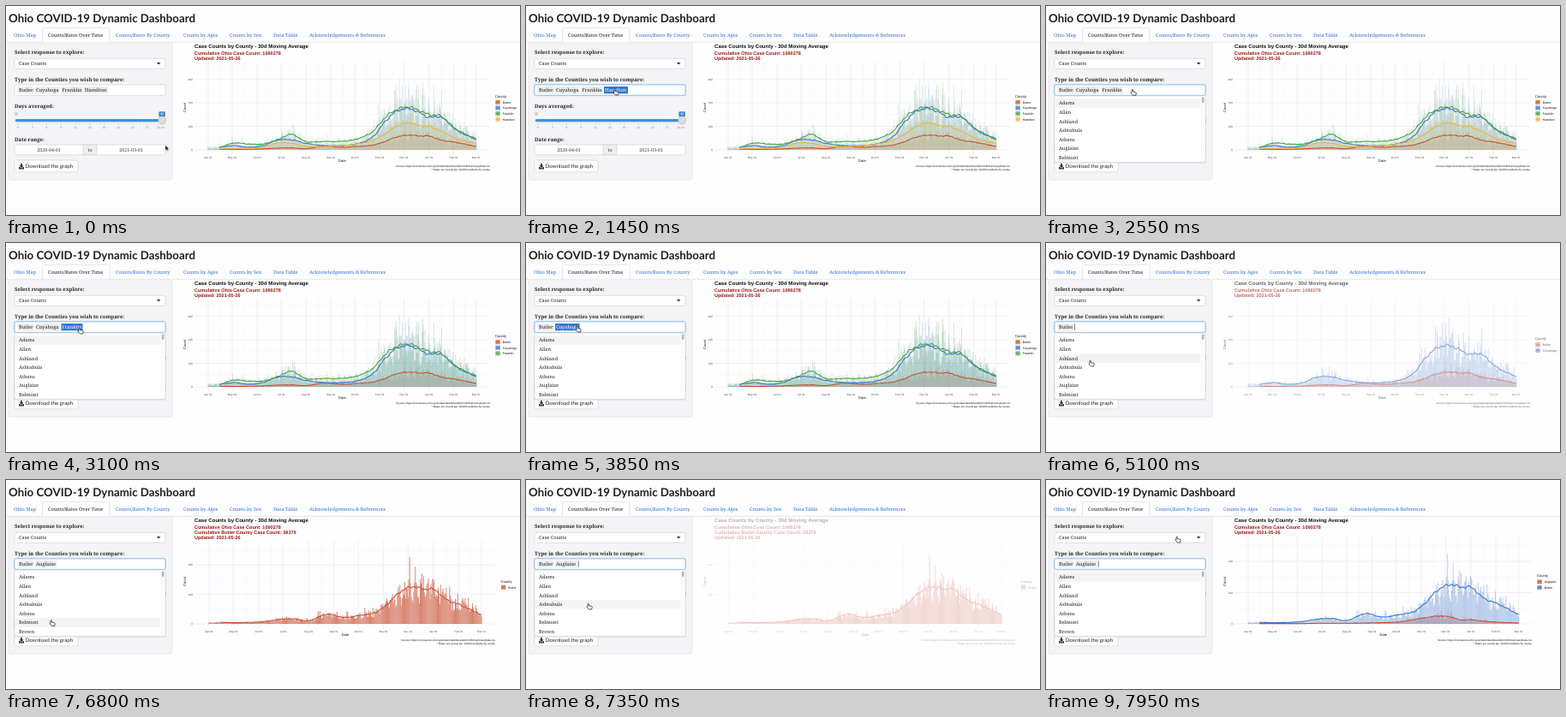
An HTML page that plays this animation: 600 by 244 pixels, repeating every 8 s.

```html
<!DOCTYPE html>
<html lang="en">
<head>
<meta charset="utf-8">
<title>Ohio COVID-19 Dynamic Dashboard</title>
<style>
  html, body { margin: 0; width: 100%; height: 100%; overflow: hidden; background: #fefdff; }
  svg { display: block; width: 600px; height: 244px; text-rendering: geometricPrecision; }
  text { white-space: pre; }
  .heading { font: 700 13.3px Lato, sans-serif; fill: #1f1f22; }
  .ui { font: 5.65px "Noto Serif", serif; fill: #222; }
  .link { fill: #2f72d2; }
  .label { font: 700 6px "Noto Serif", serif; fill: #262626; }
  .date { font: 5.4px "Noto Serif", serif; fill: #333; }
  .button { font: 6.2px Lato, sans-serif; fill: #262626; }
  .tick { font: 3.3px "Liberation Sans", Arial, sans-serif; fill: #888; }
  .chart text { font-family: "Liberation Sans", Arial, sans-serif; }
  .title { font-size: 6.1px; font-weight: 700; fill: #111; }
  .sub { font-size: 5.52px; font-weight: 700; fill: #98170e; }
  .axis { font-size: 3.2px; fill: #4d4d4d; }
  .name { font-size: 4.1px; fill: #111; }
  .key { font-size: 3.6px; fill: #111; }
  .caption { font-size: 3.08px; fill: #111; }
  .mid { text-anchor: middle; }
  .end { text-anchor: end; }
</style>
</head>
<body>
<svg id="stage" viewBox="0 0 600 244" xmlns="http://www.w3.org/2000/svg"></svg>
<script>
const LOOP = 8000;
const COLORS = ['#c94f31', '#3a74c8', '#43a047', '#eeb23c'];
const MONTHS = ['Apr', 'May', 'Jun', 'Jul', 'Aug', 'Sep', 'Oct', 'Nov', 'Dec', 'Jan', 'Feb', 'Mar'];
const MONTH_DAYS = [0, 30, 61, 91, 122, 153, 183, 214, 244, 275, 306, 334];
const LAST_DAY = 334, BASE = 168;

// Moving averages, sampled at these days
const DAYS = [14, 32, 50, 68, 86, 104, 122, 145, 165, 185, 205, 220, 234, 250, 262, 276, 290, 310, 334];
const CASES = {
  Butler:   [5, 4, 5, 8, 15, 17, 11, 33, 22, 29, 40, 70, 108, 126, 118, 116, 84, 62, 30],
  Cuyahoga: [22, 36, 22, 36, 82, 85, 55, 36, 37, 50, 110, 235, 325, 350, 320, 275, 280, 165, 87],
  Franklin: [20, 58, 50, 50, 85, 132, 70, 72, 72, 92, 155, 270, 338, 362, 335, 298, 285, 172, 94],
  Hamilton: [8, 12, 14, 22, 58, 55, 30, 28, 35, 50, 80, 135, 195, 230, 205, 195, 160, 95, 55],
  Auglaize: [1, 1, 1, 1, 2, 2, 2, 3, 4, 6, 14, 20, 25, 22, 13, 13, 9, 5, 3]
};

const wide = { x0: 236, dx: .9365, unit: .1378, step: 200, max: 600, top: 65, right: 565, legend: 571 };
const CHARTS = [
  { ...wide, until: 2900, names: ['Butler', 'Cuyahoga', 'Franklin', 'Hamilton'] },
  { ...wide, until: 4350, names: ['Butler', 'Cuyahoga', 'Franklin'] },
  { ...wide, until: 5500, names: ['Butler', 'Cuyahoga'] },
  { x0: 237, dx: .952, unit: .345, step: 100, max: 200, top: 71, right: 571, legend: 577.5,
    until: 7400, names: ['Butler'], note: 'Cumulative Butler County Case Count: 38379' },
  { x0: 236, dx: .945, unit: .365, step: 100, max: 200, top: 66, right: 567, legend: 573,
    until: LOOP, names: ['Auglaize', 'Butler'] }
];
const FADES = [2600, 4020, 4970, 7000];

const FIELD = [
  { at: 0, items: ['Butler', 'Cuyahoga', 'Franklin', 'Hamilton'] },
  { at: 850, items: ['Butler', 'Cuyahoga', 'Franklin', 'Hamilton'], picked: 'Hamilton', focus: true },
  { at: 2100, items: ['Butler', 'Cuyahoga', 'Franklin'], focus: true, open: true },
  { at: 2900, items: ['Butler', 'Cuyahoga', 'Franklin'], picked: 'Franklin', focus: true, open: true },
  { at: 3500, items: ['Butler', 'Cuyahoga'], focus: true, open: true },
  { at: 3700, items: ['Butler', 'Cuyahoga'], picked: 'Cuyahoga', focus: true, open: true },
  { at: 4450, items: ['Butler'], focus: true, open: true },
  { at: 6500, items: ['Butler', 'Auglaize'], focus: true, open: true }
];
const SLOTS = { Butler: [15, 16], Cuyahoga: [35, 26.5], Franklin: [65.5, 23], Hamilton: [92, 26], Auglaize: [35, 23.5] };
const OPTIONS = ['Adams', 'Allen', 'Ashland', 'Ashtabula', 'Athens', 'Auglaize', 'Belmont', 'Brown'];
const LIST_TOP = 108, ROW = 10.65;

// time, x, y of the pointer tip
const POINTER = [
  [0, 186, 162.5], [100, 186, 162.5], [800, 103, 97], [2450, 103, 97], [2850, 85, 99], [3300, 85, 99],
  [3650, 59, 97], [4400, 59, 97], [4950, 51, 137], [5200, 51, 137], [5900, 51, 156],
  [6550, 51, 156], [6780, 52, 163.5], [7150, 52, 163.5], [7850, 152, 66], [8000, 152, 66]
];

const lastAt = (list, t) => list.filter(s => s.at <= t).pop();
const text = (x, y, str, cls, more = '') =>
  `<text x="${x}" y="${y}" class="${cls}" ${more}>${str.replace('&', '&amp;')}</text>`;
const box = (x, y, w, h, fill, stroke = 'none', r = 0) =>
  `<rect x="${x}" y="${y}" width="${w}" height="${h}" rx="${r}" fill="${fill}" stroke="${stroke}" stroke-width=".6"/>`;
const path = (d, more) => `<path d="${d}" ${more}/>`;
const rand = n => { const s = Math.sin(n * 12.9898) * 43758.5453; return s - Math.floor(s); };

function average(name, day) {
  const v = CASES[name], n = DAYS.length;
  if (day <= DAYS[0]) return v[0];
  const i = Math.min(n - 2, DAYS.findLastIndex(d => d <= day));
  const slope = k => {
    const a = Math.max(0, k - 1), b = Math.min(n - 1, k + 1);
    return (v[b] - v[a]) / (DAYS[b] - DAYS[a]);
  };
  const h = DAYS[i + 1] - DAYS[i], u = (day - DAYS[i]) / h, u2 = u * u, u3 = u2 * u;
  const y = v[i] * (2 * u3 - 3 * u2 + 1) + v[i + 1] * (3 * u2 - 2 * u3)
    + h * (slope(i) * (u3 - 2 * u2 + u) + slope(i + 1) * (u3 - u2));
  return y * (1 + .02 * Math.sin(day * .9 + v[3]) + .018 * Math.sin(day * .41 + v[4]));
}

function daily(name, day) {
  const seed = day + name.charCodeAt(0) * 1000;
  const spike = rand(seed + .3) > .8 ? .25 + .5 * rand(seed + .6) : 0;
  return average(name, day) * (.64 + .6 * rand(seed) + .12 * Math.sin(day * 2 * Math.PI / 7) + spike);
}

function chart(c) {
  const { x0, dx, names, legend } = c, n = names.length;
  const X = d => x0 + d * dx, Y = v => BASE - v * c.unit;
  const left = x0 - 16, right = X(LAST_DAY) + 16, bottom = 173;
  let major = '', minor = '', out = '';
  const vertical = d => `M${X(d)} ${c.top}V${bottom}`, horizontal = v => `M${left} ${Y(v)}H${right}`;
  MONTH_DAYS.forEach((d, i) => {
    major += vertical(d);
    if (i) minor += vertical((d + MONTH_DAYS[i - 1]) / 2);
    out += text(X(d), 178, MONTHS[i] + ' 01', 'axis mid');
  });
  for (let v = 0; v <= c.max; v += c.step) {
    major += horizontal(v);
    if (Y(v + c.step / 2) > c.top) minor += horizontal(v + c.step / 2);
    out += text(218, Y(v) + 1.2, String(v), 'axis end');
  }
  out += path(minor, 'stroke="#ededed" stroke-width=".3"') + path(major, 'stroke="#e6e6e6" stroke-width=".55"');

  names.forEach((name, i) => {
    let bars = '';
    const shift = (i - (n - 1) / 2) * dx / n;
    for (let d = 0; d <= LAST_DAY; d++) bars += `M${(X(d) + shift).toFixed(2)} ${BASE}V${Y(daily(name, d)).toFixed(2)}`;
    out += path(bars, `stroke="${COLORS[i]}" stroke-width="${dx / n}" opacity=".72"`);
  });
  names.forEach((name, i) => {
    let line = '';
    for (let d = DAYS[0]; d <= LAST_DAY; d++) line += `${line ? 'L' : 'M'}${X(d).toFixed(2)} ${Y(average(name, d)).toFixed(2)}`;
    out += path(line, `fill="none" stroke="${COLORS[i]}" stroke-width="1.1" stroke-linejoin="round"`);
  });

  const mid = (left + right) / 2, ly = 118.5 - n * 3.3 + (c.note ? 3 : 0);
  out += text(legend, ly + 1.4, 'County', 'name');
  names.forEach((name, i) => {
    const y = ly + 7 + i * 6.65;
    out += `<g opacity=".65">${box(legend + .4, y - 2.6, 5.4, 5.2, COLORS[i])}</g>`
      + path(`M${legend + .7} ${y}h4.8`, `stroke="${COLORS[i]}" stroke-width="1"`)
      + text(legend + 8.7, y + 1.3, name, 'key');
  });
  const notes = ['Cumulative Ohio Case Count: 1090278', c.note, 'Updated: 2021-05-26'].filter(Boolean);
  out += text(220, 48.7, 'Case Counts by County - 30d Moving Average', 'title');
  notes.forEach((s, i) => out += text(220, 56.9 + i * 6.05, s, 'sub'));
  out += text(mid, 182.4, 'Date', 'name mid')
    + text(0, 0, 'Count', 'name mid', `transform="translate(210 118.5) rotate(-90)"`)
    + text(c.right, 188.2, 'Source: https://coronavirus.ohio.gov/static/dashboards/COVIDSummaryData.csv', 'caption end')
    + text(c.right, 192.3, '* Rates are counts per 10,000 residents by county', 'caption end');
  return `<g class="chart">${out}</g>`;
}

function page() {
  let s = text(3, 19, 'Ohio COVID-19 Dynamic Dashboard', 'heading');
  s += path('M0 42.3H42.5V27.5q0-2 2-2H119q2 0 2 2V42.3H600', 'fill="none" stroke="#ddd" stroke-width=".7"');
  s += text(49, 36, 'Counts/Rates Over Time', 'ui');
  [[9, 'Ohio Map'], [128, 'Counts/Rates By County'], [207, 'Counts by Ages'], [261, 'Counts by Sex'],
    [312, 'Data Table'], [354, 'Acknowledgements & References']].forEach(([x, str]) => s += text(x, 36, str, 'ui link'));
  s += box(3, 42.8, 191, 160.2, '#f4f3f5', '#e0e0e0', 2);
  [[56.4, 'Select response to explore:'], [87.6, 'Type in the Counties you wish to compare:'],
    [119, 'Days averaged:'], [157.8, 'Date range:']].forEach(([y, str]) => s += text(10, y, str, 'label'));
  s += box(10, 61.3, 176, 11.9, '#fff', '#ccc', 1.6) + text(15, 69.2, 'Case Counts', 'ui')
    + path('M176 66h4.4l-2.2 2.6z', 'fill="#333"');

  s += box(10, 123.8, 4.2, 4.6, '#e1e1e1', 'none', 1) + text(12.1, 127.3, '0', 'tick mid')
    + box(178.3, 123.2, 7.6, 6, '#428bca', 'none', 1) + text(182.1, 127.4, '30', 'tick mid', 'style="fill:#fff"')
    + box(10, 132, 176, 3.2, '#ddd', 'none', 1.4) + box(11, 132, 171, 3.2, '#3f8fdc', 'none', 1.4);
  let ticks = '';
  for (let i = 0; i <= 40; i++) ticks += `M${14 + i * 4.19} 136.4v${i % 4 ? 1.3 : 2.6}`;
  s += path(ticks, 'stroke="#aaa" stroke-width=".4"');
  for (let i = 0; i < 10; i++) s += text(14 + i * 16.75, 143.2, String(i * 3), 'tick mid');
  s += text(184.5, 143.2, '29 30', 'tick end')
    + '<circle cx="182.2" cy="133.4" r="4.4" fill="#dedede" stroke="#aaa" stroke-width=".6"/>';

  s += box(10, 162, 176, 11.8, '#fff', '#ccc', 1.4) + box(90, 162, 16, 11.8, '#eee', '#ccc')
    + text(50, 170, '2020-04-01', 'date mid') + text(98, 169.8, 'to', 'date mid') + text(146, 170, '2021-03-01', 'date mid');
  s += box(10, 180, 74, 13.8, '#fff', '#ccc', 2)
    + path('M17.1 183.8h1.8v2.4h1.7l-2.6 2.7-2.6-2.7h1.7zM15 188h1l2 1.6 2-1.6h1v2.4h-6z', 'fill="#333"')
    + text(22.7, 189.3, 'Download the graph', 'button');
  return s;
}

function field(state, active, caret) {
  let s = state.focus ? box(9.4, 91.3, 177.2, 13.6, 'none', '#bcdcf8', 2.2) : '';
  s += box(10, 91.9, 176, 12.4, '#fff', state.focus ? '#4a9de8' : '#ccc', 1.6);
  let end = 0;
  state.items.forEach(name => {
    const [x, w] = SLOTS[name], on = name === state.picked;
    s += box(x - 1, 94, w + 2, 8.3, on ? '#2f78cf' : '#ececec', 'none', .6)
      + text(x, 100.1, name, 'ui', on ? 'style="fill:#fff"' : '');
    end = x + w;
  });
  if (caret && state.focus && !state.picked) s += box(end + 2.4, 94.2, .6, 7.6, '#333');
  if (!state.open) return s;
  s += box(9, 107, 178, 77, 'rgba(0,0,0,.06)', 'none', 2) + box(10, 105, 176, 77.3, '#fff', '#ccc', 1)
    + box(10.4, LIST_TOP + active * ROW, 169.6, ROW, '#f3f3f3')
    + box(180.2, 105.4, 5.4, 76.5, '#fafafa') + box(181.7, 106.2, 3, 6.8, '#bdbdbd', 'none', 1.5);
  OPTIONS.filter(o => !state.items.includes(o)).slice(0, 7)
    .forEach((o, i) => s += text(15, 115.2 + i * ROW, o, 'ui'));
  return s;
}

const ARROW = path('M0 0V6.2L1.5 4.9 2.5 7.1 3.6 6.6 2.6 4.5H4.5Z', 'fill="#111" stroke="#fff" stroke-width=".5"');
const HAND = path('M0 .5Q.8-.3 1.4.6V2.6L4.3 3.2Q5.3 3.5 5.2 4.6L4.6 7H1.6L-.9 4.3Q-.9 3.4 0 3.9Z',
  'fill="#fff" stroke="#111" stroke-width=".7" stroke-linejoin="round"');

const stage = document.getElementById('stage');
stage.innerHTML = page() + CHARTS.map(chart).join('') + `<g id="field"></g><g id="arrow">${ARROW}</g><g id="hand">${HAND}</g>`;
const charts = [...stage.querySelectorAll('.chart')];
const [fieldEl, arrow, hand] = ['field', 'arrow', 'hand'].map(id => document.getElementById(id));

function pointerAt(t) {
  const i = Math.max(1, POINTER.findIndex(p => p[0] > t));
  const [t0, x0, y0] = POINTER[i - 1], [t1, x1, y1] = POINTER[i];
  const u = (t - t0) / (t1 - t0), e = u * u * (3 - 2 * u);
  return [x0 + (x1 - x0) * e, y0 + (y1 - y0) * e];
}

let shown = '';
function draw(t) {
  const current = CHARTS.findIndex(c => t < c.until);
  charts.forEach((g, i) => g.style.display = i === current ? '' : 'none');
  const fade = FADES[current] === undefined ? 0 : Math.min(1, Math.max(0, (t - FADES[current]) / 250));
  charts[current].setAttribute('opacity', 1 - .7 * fade);

  const [x, y] = pointerAt(t);
  const row = Math.floor((y - LIST_TOP) / ROW);
  const active = t > 4500 && t < 7700 && row >= 0 ? row : 0;
  const markup = field(lastAt(FIELD, t), active, (t + 100) % 1000 < 500);
  if (markup !== shown) fieldEl.innerHTML = shown = markup;

  const pointing = t > 700;
  arrow.style.display = pointing ? 'none' : '';
  hand.style.display = pointing ? '' : 'none';
  (pointing ? hand : arrow).setAttribute('transform', `translate(${x.toFixed(2)} ${y.toFixed(2)})`);
}

const start = performance.now();
function tick() {
  draw((performance.now() - start) % LOOP);
  requestAnimationFrame(tick);
}
tick();
</script>
</body>
</html>
```
